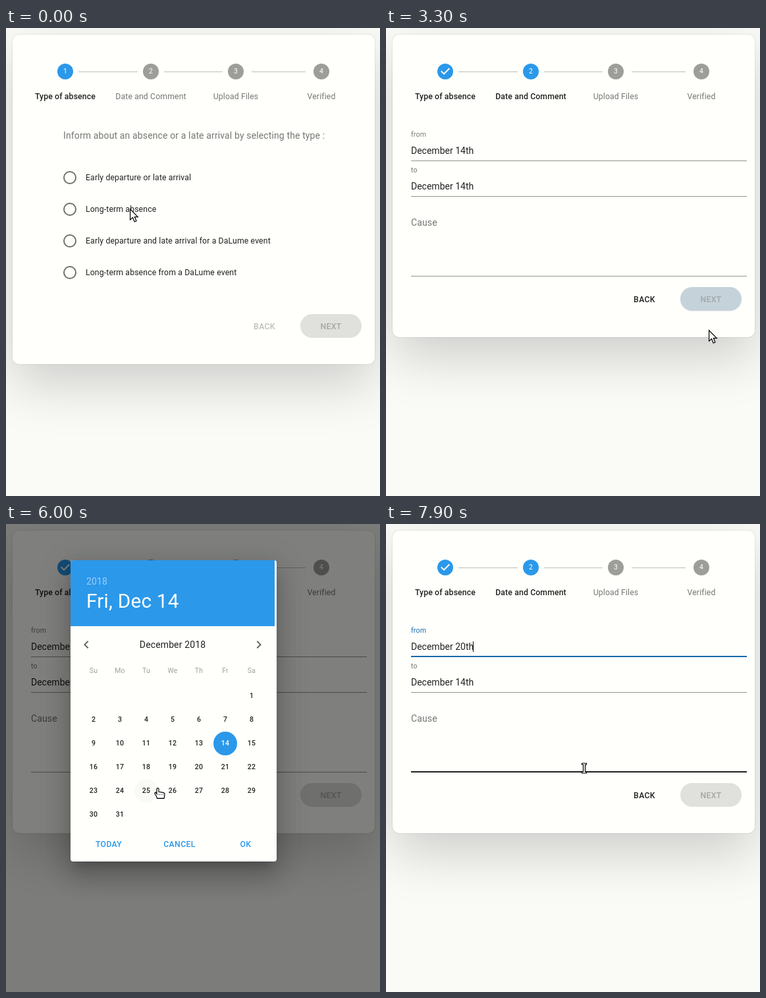
Write an HTML page that moves like this. It is 568 by 710 pixels and loops after 8 s.

```html
<!DOCTYPE html>
<html lang="en">
<head>
<meta charset="utf-8">
<title>Absence form</title>
<style>
  html, body { margin: 0; width: 100%; height: 100%; overflow: hidden; }
  body { position: relative; background: #fafaf7; font-family: Roboto, sans-serif; }
  div, svg { position: absolute; }
  svg { overflow: visible; }
  .text { white-space: pre; line-height: 20px; height: 20px; }
</style>
</head>
<body>
<script>
const LOOP = 8000, TICK = 100;
const PICK = 650, NEXT = 3150, FOCUS = 4400, OPEN = 4642, SELECT = 7330, CLOSE = 7347;
const BLUE = '#2b98ea', DARK_BLUE = '#1769aa', PINK = '#b30059', PAPER = '#fffffc';
const INK = 'rgba(0,0,0,.87)', GREY = 'rgba(0,0,0,.54)', FAINT = 'rgba(0,0,0,.38)';
const SPACING = { 14: .00938, 12.25: .01071, 10.5: .02, 29.75: .00735 };

// Building helpers
function box(parent, x, y, w, h, css = '', html = '') {
  const el = document.createElement('div');
  el.style.cssText = `left:${x}px;top:${y}px;width:${w}px;height:${h}px;${css}`;
  el.innerHTML = html;
  parent.append(el);
  return el;
}
function text(parent, str, x, y, size, css = '', centered = false) {
  const el = box(parent, centered ? x - 150 : x, y - 10, centered ? 300 : 420, 20,
    `font-size:${size}px;letter-spacing:${SPACING[size]}em;color:${INK};` +
    (centered ? 'text-align:center;' : '') + css, str);
  el.className = 'text';
  return el;
}
const label = (parent, str, x, y, size, css) => text(parent, str, x, y, size, css, true);
const caps = 'font-weight:500;letter-spacing:.02857em;';
const disc = (parent, x, y, r, color) =>
  box(parent, x - r, y - r, 2 * r, 2 * r, `border-radius:50%;background:${color};`);
const icon = (parent, x, y, path, color) =>
  box(parent, x - 12, y - 12, 24, 24, '', `<svg width="24" height="24"><path d="${path}" fill="${color}"/></svg>`);
const show = (el, on) => el.style.display = on ? '' : 'none';

// Timing helpers
const clamp = v => Math.max(0, Math.min(1, v));
function ease(t, start, length, x1 = .4) {
  const x = clamp((t - start) / length);
  let lo = 0, hi = 1, s = .5;
  for (let i = 0; i < 24; i++) {
    s = (lo + hi) / 2;
    const at = 3 * s * (1 - s) ** 2 * x1 + .6 * s * s * (1 - s) + s ** 3;
    if (at < x) lo = s; else hi = s;
  }
  return 3 * s * s * (1 - s) + s ** 3;
}
const easeOut = (t, start, length) => ease(t, start, length, 0);
const mix = (a, b, p) => `color-mix(in srgb, ${b} ${p * 100}%, ${a})`;

// Card and stepper
const card = box(document.body, 10, 10, 550, 500, `border-radius:10px;background:${PAPER};
  box-shadow:0 30px 80px rgba(0,0,0,.18),0 0 2px rgba(0,0,0,.18);`);
const page = box(document.body, 0, 0, 568, 710);
const steps = ['Type of absence', 'Date and Comment', 'Upload Files', 'Verified'].map((name, i) => {
  const x = [90, 220, 349, 479][i];
  return {
    dot: disc(page, x, 66, 12, '#9d9d99'),
    number: label(page, i + 1, x, 66, 10.5, `color:${PAPER};letter-spacing:0;`),
    name: label(page, name, x, 103.5, 12.25)
  };
});
[[110, 200], [240, 329], [373, 455]].forEach(([a, b]) => box(page, a, 66, b - a, 1, 'background:#bdbdb9;'));
const check = icon(page, 90, 66, 'M10 17L5 12L6.4 10.6L10 14.2L17.6 6.6L19 8Z', PAPER);

// First step
const first = box(page, 0, 0, 568, 510);
const question = text(first, 'Inform about an absence or a late arrival by selecting the type :', 87, 163, 14);
const radios = ['Early departure or late arrival', 'Long-term absence',
  'Early departure and late arrival for a DaLume event', 'Long-term absence from a DaLume event'].map((name, i) => {
  const y = 226.5 + 48 * i;
  text(first, name, 121, y, 12.25);
  return box(first, 87, y - 10, 16, 16, 'border:2px solid #70706d;border-radius:50%;');
});
const radioDot = disc(first, 97, 274.5, 5, PINK);

// Second step
const second = box(page, 0, 0, 568, 510);
const fromLabel = text(second, 'from', 38, 162, 10.5);
const fromDate = text(second, '', 38, 186, 14, 'letter-spacing:0;');
text(second, 'to', 38, 216, 10.5, `color:${GREY};`);
text(second, 'December 14th', 38, 240, 14, 'letter-spacing:0;');
text(second, 'Cause', 38, 295, 14, `color:${GREY};`);
const fields = [[170, 201], [224, 255], [285, 376]].map(([top, bottom]) => {
  box(second, 38, bottom, 510, 1, 'background:#949491;');
  return { top, bottom, hover: box(second, 38, bottom - 1, 510, 2, 'background:#20201f;') };
});
const focusLine = box(second, 38, 200, 510, 2, `background:${DARK_BLUE};`);
const caret = box(second, 132, 178, 1, 16, 'background:#111;');

// Card buttons
const actions = box(page, 0, 0, 568, 36);
const back = label(actions, 'BACK', 392.5, 18.5, 12.25, caps);
box(actions, 447, 0, 93, 36, 'border-radius:18px;background:#e0e0dc;');
const nextFill = box(actions, 447, 0, 93, 36, `border-radius:18px;
  box-shadow:0 1px 5px rgba(0,0,0,.2),0 2px 2px rgba(0,0,0,.14),0 3px 1px -2px rgba(0,0,0,.12);`);
const next = label(actions, 'NEXT', 493.5, 18.5, 12.25, caps);

// Date picker
const backdrop = box(document.body, 0, 0, 568, 710, 'background:rgba(0,0,0,.5);');
const dialog = box(document.body, 98, 55, 313, 457, `border-radius:4px;background:${PAPER};
  box-shadow:0 11px 15px -7px rgba(0,0,0,.2),0 24px 38px 3px rgba(0,0,0,.14),0 9px 46px 8px rgba(0,0,0,.12);`);
box(dialog, 0, 0, 310, 100, `border-radius:4px 0 0 0;background:${BLUE};`);
text(dialog, '2018', 24, 32, 14, 'color:rgba(255,255,255,.54);');
const heading = text(dialog, '', 24, 62, 29.75, `color:${PAPER};`);
label(dialog, 'December 2018', 155, 128, 14);
icon(dialog, 24, 128, 'M15.4 7.4L14 6L8 12L14 18L15.4 16.6L10.8 12Z', '#666');
icon(dialog, 286, 128, 'M8.6 16.6L13.2 12L8.6 7.4L10 6L16 12L10 18Z', '#666');
['Su', 'Mo', 'Tu', 'We', 'Th', 'Fr', 'Sa'].forEach((d, i) =>
  label(dialog, d, 35 + 40 * i, 167.5, 10.5, `color:${FAINT};`));
const days = Array.from({ length: 31 }, (_, i) => {
  const x = 35 + 40 * ((i + 6) % 7), y = 206 + 36 * Math.floor((i + 6) / 7);
  return {
    x, y,
    hover: disc(dialog, x, y, 18, '#000'),
    fill: disc(dialog, x, y, 18, BLUE),
    ripple: i === 19 && disc(dialog, x, y, 18, 'rgba(190,190,185,.4)'),
    name: label(dialog, i + 1, x, y, 10.5, 'font-weight:500;')
  };
});
[['TODAY', 58], ['CANCEL', 165.5], ['OK', 266]].forEach(([name, x]) =>
  label(dialog, name, x, 431, 12.25, caps + `color:${BLUE};`));

// Pointer shapes, all drawn around the hot spot
const pointer = box(document.body, 0, 0, 0, 0, '', `<svg width="1" height="1" fill="#fff" stroke="#000" stroke-width="1.2">
  <path d="M.6 .8V17L4.5 13.5L7.2 20L10 18.8L7.3 12.6H12.3Z"/>
  <g><path d="M-1.5 10V2Q-1.5 .6 0 .6T1.5 2V6.3L8 7.4Q10.5 8 10.5 10L9.5 16.4H-1L-2 13L-4.4 9.5Q-5 7 -3 7Z"/>
    <path d="M0 10.5H8.5M-1 16.2H9.5" stroke-dasharray="1 1.5"/></g>
  <path d="M-3 -7H4V-5H2V6H4V8H-3V6H-1V-5H-3Z"/></svg>`);
const shapes = [...pointer.firstChild.children];
const route = [
  [0, 188, 274], [400, 188, 274], [500, 189, 274], [2300, 189, 274], [2400, 197.5, 274], [2500, 245, 305],
  [2700, 430, 430], [2850, 490, 458], [3700, 490, 458], [3800, 470, 440], [4100, 260, 275], [4350, 133.5, 184.5],
  [5200, 133.5, 184.5], [5300, 133, 205], [5600, 140, 340], [5800, 168, 392], [6000, 230.5, 400],
  [6100, 306, 400], [6200, 311, 401], [6300, 311, 401], [6600, 303, 371], [6700, 303, 368],
  [6900, 303, 368], [7000, 299.5, 366], [7500, 299.5, 366], [7600, 300.5, 370], [8000, 300.5, 370]
];
function pointerAt(t) {
  const i = Math.max(1, route.findIndex(k => k[0] >= t));
  const [a, b] = [route[i - 1], route[i]], p = (t - a[0]) / (b[0] - a[0]);
  return [a[1] + (b[1] - a[1]) * p, a[2] + (b[2] - a[2]) * p];
}

function draw(t) {
  const [x, y] = pointerAt(t);
  const onDates = t >= NEXT, opacity = ease(t, OPEN, 225) - ease(t, CLOSE, 195);
  const modal = opacity > .001, picked = t >= PICK, chosen = t >= SELECT;

  card.style.height = (onDates ? 459 : 500) + 'px';
  actions.style.top = (onDates ? 393 : 434) + 'px';
  show(first, !onDates);
  show(second, onDates);
  show(check, onDates);
  steps.forEach(({ dot, number, name }, i) => {
    const active = i <= +onDates;
    dot.style.background = active ? BLUE : '#9d9d99';
    name.style.color = active ? INK : GREY;
    name.style.fontWeight = active ? 500 : 400;
    show(number, i || !onDates);
  });

  question.style.color = mix(GREY, DARK_BLUE, ease(t, PICK, 200));
  radios[1].style.borderColor = picked ? PINK : '#70706d';
  show(radioDot, picked);
  const enabled = ease(t, PICK, 300) - ease(t, NEXT, 250);
  nextFill.style.opacity = enabled;
  nextFill.style.background = mix(BLUE, '#1976d2', ease(t, 2750, 250));
  next.style.color = mix('rgba(0,0,0,.26)', PAPER, enabled);
  back.style.color = onDates ? INK : 'rgba(0,0,0,.26)';

  const focus = clamp(easeOut(t, FOCUS, 200) - easeOut(t, OPEN, 158) + easeOut(t, CLOSE, 200));
  focusLine.style.transform = `scaleX(${focus})`;
  fromLabel.style.color = mix(GREY, DARK_BLUE, focus);
  fromDate.textContent = chosen ? 'December 20th' : 'December 14th';
  show(caret, t >= FOCUS && t < OPEN || t >= CLOSE);
  const over = modal ? -1 : fields.findIndex(f => y >= f.top && y <= f.bottom && x < 548);
  fields.forEach((f, i) => show(f.hover, i === over && (i || !focus)));

  backdrop.style.opacity = dialog.style.opacity = opacity;
  show(backdrop, modal);
  show(dialog, modal);
  const left = t >= CLOSE ? 92 : 98, swap = ease(t, SELECT, 160);
  dialog.style.left = left + 'px';
  heading.textContent = chosen ? 'Thu, Dec 20' : 'Fri, Dec 14';
  days.forEach((d, i) => {
    const day = i + 1, selected = day === (chosen ? 20 : 14);
    const distance = Math.hypot(x - left - d.x, y - 55 - d.y);
    d.hover.style.opacity = .08 * clamp((20 - distance) / 6);
    d.fill.style.opacity = day === 14 ? 1 - swap : day === 20 ? swap : 0;
    d.name.style.color = selected ? PAPER : day === 14 ? BLUE : INK;
    if (d.ripple) d.ripple.style.transform = `scale(${clamp((t - 7150) / 400)})`;
  });

  let shape = 0;
  if (modal) shape = 1;
  else if (onDates) shape = over < 0 ? 0 : over < 2 ? 1 : 2;
  else if (t >= 500) shape = x < 225 || x > 447 && y > 434 ? 1 : 0;
  shapes.forEach((s, i) => show(s, i === shape));
  pointer.style.transform = `translate(${x}px,${y}px)`;
}

function frame() {
  draw(Math.floor(performance.now() % LOOP / TICK) * TICK);
  requestAnimationFrame(frame);
}
frame();
</script>
</body>
</html>
```
